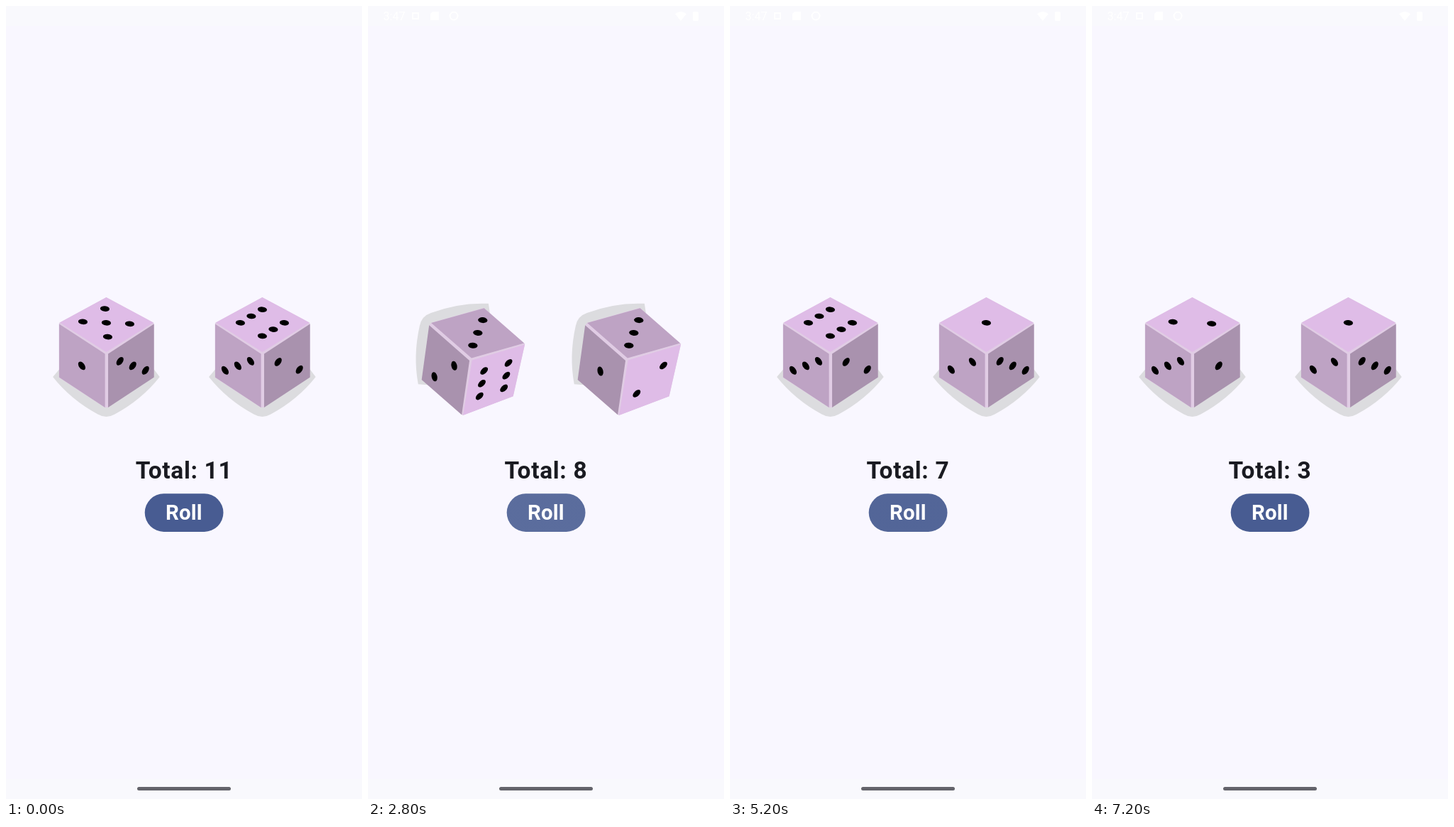
Recreate the animation shown at these times as an HTML page with a canvas. Size 502 px wide and 1116 px high, loop 8000 ms.

```html
<!DOCTYPE html>
<html lang="en">
<head>
<meta charset="utf-8">
<title>Dice roller</title>
<style>
  html, body { margin: 0; width: 100%; height: 100%; overflow: hidden; background: #f9f7ff; }
  canvas { display: block; width: 502px; height: 1116px; }
</style>
</head>
<body>
<canvas id="stage" width="502" height="1116"></canvas>
<script>
const ctx = document.getElementById('stage').getContext('2d');
const LOOP = 8000;
const STEP = 100; // the screen refreshes ten times a second
const TAU = Math.PI * 2;

// start: dice begin to turn; hold: how long before that the finger went down (ms)
const rolls = [
  { start: -LOOP, hold: 0, dice: [5, 6] },
  { start: 1725, hold: 24, dice: [2, 5] },
  { start: 2725, hold: 24, dice: [6, 2] },
  { start: 4025, hold: 145, dice: [6, 1] },
  { start: 5225, hold: 265, dice: [2, 5] },
  { start: 6425, hold: 24, dice: [2, 1] }
];

// Left and right numbers that go with each top number.
const sides = { 1: [2, 3], 2: [3, 1], 5: [1, 3], 6: [3, 2] };

const clamp = x => Math.max(0, Math.min(1, x));

// n evenly spaced points centred on (cx, cy).
const row = (n, dx, dy, cx = 0, cy = 0) => Array.from({ length: n }, (_, i) => {
  const k = i - (n - 1) / 2;
  return [cx + k * dx, cy + k * dy];
});

function topPips(n) {
  if (n === 6) return [...row(3, 15.5, -9.3, -15.5, -9.3), ...row(3, 15.5, -9.3, 15.5, 9.3)];
  if (n === 5) return [...row(3, 33, 1.5), ...row(2, 4, 39.5)];
  return row(n, 54.5, 2.5);
}

function sidePips(n) {
  const gap = n === 2 ? 30 : 18;
  return row(n, gap, gap * 0.36);
}

function drawPips(list, x, y, rx, ry, tilt) {
  ctx.fillStyle = '#000';
  for (const [px, py] of list) {
    ctx.beginPath();
    ctx.ellipse(x + px, y + py, rx, ry, tilt, 0, TAU);
    ctx.fill();
  }
}

function poly(color, points) {
  ctx.fillStyle = color;
  ctx.beginPath();
  points.forEach(([x, y]) => ctx.lineTo(x, y));
  ctx.fill();
}

function roundBox(color, x, y, w, h, r) {
  ctx.fillStyle = color;
  ctx.beginPath();
  ctx.roundRect(x, y, w, h, r);
  ctx.fill();
}

function label(text, x, y, size, color, spacing = 0, weight = 'bold') {
  ctx.font = `${weight} ${size}px Roboto, sans-serif`;
  ctx.letterSpacing = `${spacing}px`;
  ctx.textAlign = 'center';
  ctx.fillStyle = color;
  ctx.fillText(text, x, y);
}

function drawShadow() {
  ctx.fillStyle = '#dcdcdf';
  ctx.beginPath();
  ctx.moveTo(-66, 17);
  ctx.lineTo(-75.3, 28);
  ctx.quadraticCurveTo(-50, 60, -12, 80.5);
  ctx.quadraticCurveTo(0, 87.5, 12, 80.5);
  ctx.quadraticCurveTo(50, 60, 75.3, 28);
  ctx.lineTo(67, 17);
  ctx.fill();
}

// Both upright faces share one shape; dir -1 mirrors it to the left.
function drawSide(dir, color, n) {
  ctx.save();
  ctx.translate(0.4, 0);
  ctx.scale(dir, 1);
  poly(color, [[2.2, -4.5], [66.9, -46.5], [66.9, 28.5], [2.2, 71]]);
  drawPips(sidePips(n), 35.9 + dir, 12.3, 6.7, 4, -0.94);
  ctx.restore();
}

function drawDie(x, n, angle) {
  const [left, right] = sides[n];
  ctx.save();
  ctx.translate(x, 494);
  ctx.rotate(angle);
  drawShadow();
  poly('#e0cce4', [[0, -84], [67, -48], [67, 28], [2, 71], [-2, 71], [-66.5, 29], [-66.5, -48]]);
  poly('#dfbce7', [[0, -84], [66.5, -48.5], [0, -7], [-65.5, -48.5]]);
  drawPips(topPips(n), 0, -48.2, 6.6, 3.8, 0.09);
  drawSide(-1, '#bea3c4', left);
  drawSide(1, '#a992ae', right);
  ctx.restore();
}

// Critically damped spring through one full turn.
function spin(age) {
  const u = 17 * age / 1000;
  return u > 14 ? 0 : TAU * (1 - (1 + u) * Math.exp(-u));
}

function drawButton(t) {
  const shape = [195.7, 686.3, 110.8, 53.6, 26.8];
  roundBox('#485c92', ...shape);
  const tap = rolls.findLast(r => t >= r.start - r.hold);
  const age = t - tap.start + tap.hold;
  const alpha = 0.1 * clamp(age / 75) * (1 - clamp((age - 180) / 150));
  if (alpha > 0) {
    const grow = clamp(age / 110);
    const cx = 240 + 11 * grow;
    const glow = ctx.createRadialGradient(cx, 713, 0, cx, 713, 20 + 110 * grow);
    glow.addColorStop(0.6, `rgba(255,255,255,${alpha})`);
    glow.addColorStop(1, 'rgba(255,255,255,0)');
    roundBox(glow, ...shape);
  }
  label('Roll', 250.9, 723, 29.5, '#fff', 0.13);
}

function drawStatus() {
  label('3:47', 37, 20, 16, '#fff', 0, 'normal');
  ctx.strokeStyle = '#fff';
  ctx.lineWidth = 2;
  ctx.strokeRect(63, 10, 8, 8);
  poly('#fff', [[91, 8], [100, 8], [100, 20], [88, 20], [88, 11]]);
  ctx.beginPath();
  ctx.arc(121, 14, 5.5, 0, TAU);
  ctx.stroke();
  ctx.beginPath();
  ctx.moveTo(441, 21);
  ctx.lineTo(433, 11);
  ctx.quadraticCurveTo(441, 5, 449, 11);
  ctx.fill();
  roundBox('#fff', 458, 8, 8, 13, 2);
}

function draw(t) {
  ctx.fillStyle = '#f9f7ff';
  ctx.fillRect(0, 0, 502, 1116);
  ctx.fillStyle = '#f9f9fd';
  ctx.fillRect(0, 0, 502, 28);
  ctx.fillRect(0, 1088, 502, 28);
  if (t >= 1000) drawStatus();

  const { start, dice: [a, b] } = rolls.findLast(r => t >= r.start);
  const angle = spin(t - start);
  drawDie(141.4, a, angle);
  drawDie(361.4, b, angle);
  label(`Total: ${a + b}`, 251, 665, 33.5, '#1a1b21', 0.67);
  drawButton(t);
  roundBox('#64646b', 185, 1099, 132, 5, 2.5);
}

const origin = performance.now();
function tick() {
  const t = (performance.now() - origin) % LOOP;
  draw(Math.floor(t / STEP) * STEP);
  requestAnimationFrame(tick);
}
tick();
</script>
</body>
</html>
```
